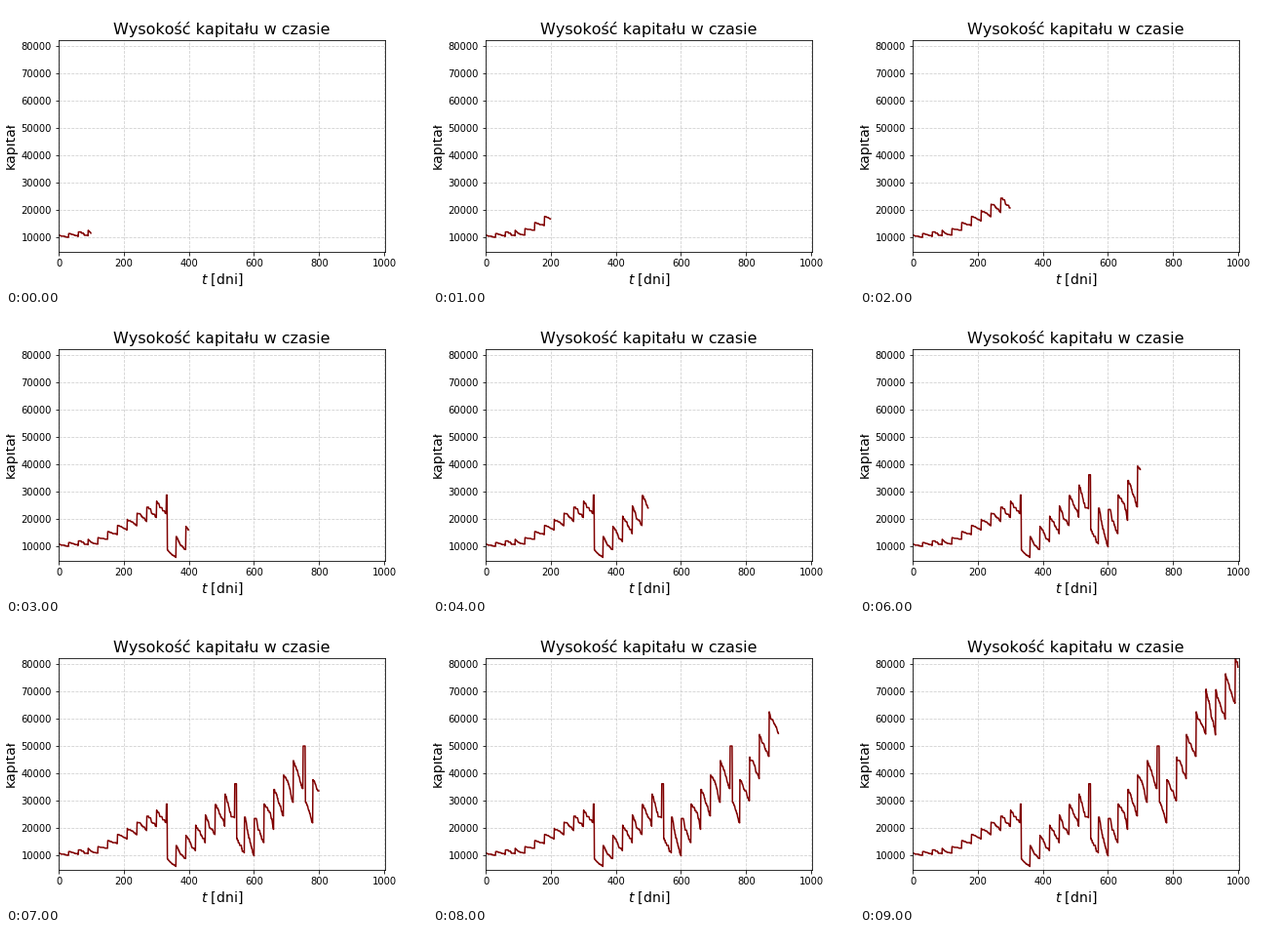
These frames come from a looping animation (432 by 288 pixels, 10 s). A matplotlib script:

```python
import matplotlib.pyplot as plt
import numpy as np
from matplotlib.animation import FuncAnimation

DAYS, MONTH, CHUNK = 1000, 30, 100

# Key points of the monthly high, and the day a heavy loss falls on.
HIGH_MONTHS = (0, 4, 11, 12, 15, 18, 19, 20, 25, 26, 30, 31, 33)
HIGHS = (10800, 13200, 28800, 13600, 24800, 36200, 24000,
         23500, 50000, 37700, 70800, 70600, 82300)
LOSS_DAY = {11: 3, 18: 6, 25: 7}
LOSS = 20000


def high(month):
    return np.interp(month, HIGH_MONTHS, HIGHS)


def income(month):
    """Payment that opens a month; it grows along a logistic curve."""
    return 17000 / (1 + np.exp((13 - month) / 5))


def month_curve(month, rng):
    """Daily capital: a staircase of claims from the high to the low."""
    low = high(month + 1) - income(month + 1)
    chance = 0.2 + 0.015 * month
    claims = (rng.random(MONTH) < chance) * (0.5 + rng.random(MONTH))
    claims[0] = 0
    claims[-1] = 0.5
    loss = 0
    if month in LOSS_DAY:
        day = LOSS_DAY[month]
        claims[:day] = 0
        loss = LOSS * (np.arange(MONTH) >= day)
    paid = np.cumsum(claims) / claims.sum()
    total = high(month) - low - np.max(loss)
    return high(month) - loss - total * paid


rng = np.random.default_rng(4)
months = [month_curve(m, rng) for m in range(DAYS // MONTH + 1)]
capital = np.concatenate([[high(0)], *months])[:DAYS]
time = np.arange(DAYS)

plt.rcParams["font.family"] = "DejaVu Sans"
plt.rcParams["text.kerning_factor"] = 6
fig, ax = plt.subplots(figsize=(6, 4), dpi=72)
fig.subplots_adjust(left=0.125, right=0.9, bottom=0.125, top=0.88)
ax.set_xlim(0, 1002)
ax.set_ylim(4700, 82300)
ax.set_title("Wysokość kapitału w czasie", fontsize=16)
ax.set_xlabel("$t$ [dni]", fontsize=14)
ax.set_ylabel("kapitał", fontsize=14)
ax.grid(linestyle="--", alpha=0.6)
line, = ax.plot([], [], color="maroon", lw=1.5)


def reset():
    line.set_data([], [])
    return line,


def draw(i):
    shown = (i + 1) * CHUNK
    line.set_data(time[:shown], capital[:shown])
    return line,


anim = FuncAnimation(fig, draw, frames=DAYS // CHUNK, init_func=reset,
                     interval=1000, repeat=True, repeat_delay=0)
plt.show()
```
